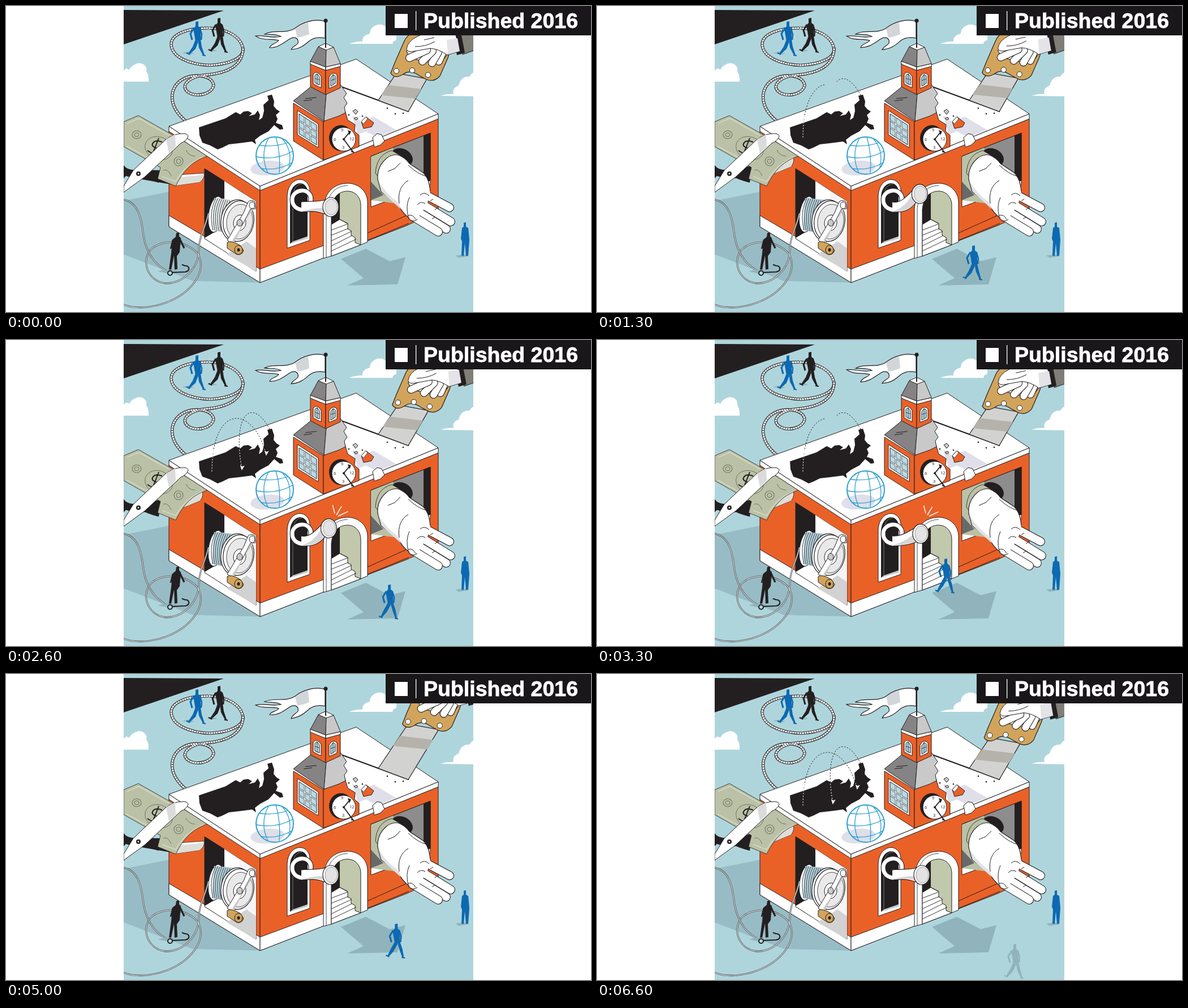
Animation of 1034 by 542 pixels, one loop 6.7 s. Source, as an HTML page with a canvas:

```html
<!DOCTYPE html>
<html lang="en">
<head>
<meta charset="utf-8">
<title>Published 2016</title>
<style>
html, body { margin: 0; width: 100%; height: 100%; overflow: hidden; background: #fff; }
canvas { display: block; }
</style>
</head>
<body>
<canvas id="stage" width="1034" height="542"></canvas>
<script>
const ctx = document.getElementById('stage').getContext('2d');
const LOOP = 6700, TAU = Math.PI * 2;
const INK = '#231f20', SKY = '#afd5dc', SHADE = '#91b4bc', ORANGE = '#ea6128',
  WHITE = '#fff', BILL = '#bbc1a6', BLUE = '#0c69b2', TAN = '#d2a45b', GREY = '#858384', PALE = '#c9c9ca';

function path(d, fill, stroke, width = 1) {
  const p = new Path2D(d);
  if (fill) { ctx.fillStyle = fill; ctx.fill(p); }
  if (stroke) { ctx.strokeStyle = stroke; ctx.lineWidth = width; ctx.stroke(p); }
}
function oval(x, y, rx, ry, fill, stroke, width = 1, turn = 0) {
  ctx.beginPath();
  ctx.ellipse(x, y, rx, ry, turn, 0, TAU);
  if (fill) { ctx.fillStyle = fill; ctx.fill(); }
  if (stroke) { ctx.strokeStyle = stroke; ctx.lineWidth = width; ctx.stroke(); }
}
function moved(x, y, turn, draw) {
  ctx.save();
  ctx.translate(x, y);
  ctx.rotate(turn);
  draw();
  ctx.restore();
}
// Linear interpolation through rows of [time, value, ...]
function keyed(rows, t) {
  if (t <= rows[0][0]) return rows[0].slice(1);
  for (let i = 1; i < rows.length; i++) {
    const a = rows[i - 1], b = rows[i];
    if (t <= b[0]) {
      const k = (t - a[0]) / (b[0] - a[0]);
      return a.slice(1).map((v, j) => v + (b[j + 1] - v) * k);
    }
  }
  return rows[rows.length - 1].slice(1);
}

// A white tube with an ink edge and round ends
function tube(d, width, cap = 'round') {
  ctx.lineCap = cap;
  path(d, null, INK, width);
  path(d, null, WHITE, width - 2.2);
  ctx.lineCap = 'butt';
}
function rope(d) {
  tube(d, 5.2, 'butt');
  ctx.setLineDash([.9, 3.4]);
  path(d, null, INK, 3);
  ctx.setLineDash([]);
}
function line(d) {
  path(d, null, '#4c4c4d', 2.8);
  path(d, null, '#dbe6e8', 1.2);
}

// A striding figure; x is its middle, y the top of its head
function walker(x, y, color, swing = 0) {
  moved(x, y, 0, () => {
    path('M-1 1L4 0L4 9L8 12L8 33L-1 36L-5 13L-1 9Z', color);
    path('M-4 12L-10 22L-7 33', null, color, 3);
    path('M7 13L10 23L9 33', null, color, 2.5);
    path(`M-1 32L${-7 + swing} 45L-14 57L-12 59L${-2 + swing} 49L4 36Z`, color);
    path(`M3 32L${6 - swing} 47L12 60L15 60L${11 - swing} 45L8 32Z`, color);
    path('M-17 56L-11 59M11 60L17 61', null, color, 2);
  });
}

function backdrop() {
  ctx.fillStyle = SKY;
  ctx.fillRect(208, 0, 618, 542);
  path('M208 7L385 8L208 68Z', INK);
  path('M208 134H252Q253 123 248 116C251 105 238 98 229 103Q221 106 218 113Q212 108 208 115Z', WHITE);
  path('M606 67Q623 62 630 63Q629 52 643 49C643 35 661 28 670 36Q680 32 690 38V60Q681 64 684 67Z', WHITE);
  path('M768 159Q780 155 791 156Q788 145 800 141Q804 124 819 125Q823 119 826 118V160Z', WHITE);
  path('M208 345L288 329V388L449 490L330 487L208 440Z', '#98bcc6');
  path('M592 448L636 430L678 452L706 445L692 493L603 495L632 482Z', SHADE);
  rope('M358 39C318 39 291 51 292 69C294 90 323 104 361 105C396 103 419 92 419 77C416 53 388 40 359 39');
  rope('M419 74C419 105 392 119 353 122C323 125 310 140 319 150C332 164 365 157 367 140C364 122 331 119 312 130C289 143 284 176 318 204');
  path('M311 83L321 81L333 84L325 86ZM355 78L363 76L374 79L363 81Z', SHADE);
  walker(336, 27, BLUE, 1);
  walker(375, 21, INK, 1);
}

function flag(t) {
  const w = 2 * Math.sin(t / LOOP * TAU * 5);
  path(`M564 27C546 22 525 28 510 40C494 50 472 41 457 ${50 + w / 2}C468 51 478 49 486 54
    C468 58 456 51 441 ${53 - w}C454 62 469 57 482 61C478 67 468 66 466 ${74 + w}
    C481 74 491 65 502 58C511 53 518 58 516 66C512 71 507 71 504 ${77 - w}
    C521 76 529 68 536 62C545 55 555 55 564 57Z`, WHITE, INK, 1.2);
  path('M511 40Q522 32 534 29L536 50Q524 55 515 56Z', '#d2d6d9');
  path('M565 26V74', null, INK, 2);
  oval(565, 26, 3.5, 3.5, INK);
}

function walls() {
  path('M288 221L449 326V490L288 391Z', ORANGE, INK);
  path('M449 326L764 200V363L708 389L449 490Z', ORANGE, INK);
  path('M288 371L449 466V490L288 391Z', WHITE, INK);
  path('M449 466L562 424V446L449 490Z', WHITE, INK);
  path('M639 402L708 371L745 355M639 415L712 385', null, INK, 1);
}

function roof() {
  path('M288 213L449 319V327L288 222Z', WHITE, INK);
  path('M449 319L764 191V200L449 327Z', WHITE, INK);
  path('M288 213L619 94L764 191L449 319Z', WHITE, INK);
  path('M612 194L628 205L650 196L690 220L655 232L636 222L622 228Z', '#dedfe8');
  path('M590 142L658 167L712 187', null, INK, 2.2);
  path('M341 215L388 199L406 188L414 192L420 187L428 186L435 190L429 195L440 192L445 185L449 193L447 202L453 198L456 186L455 175L464 167L462 159L470 157L474 169L473 177L478 183L484 187L477 193L480 200L477 207L488 211L490 218L484 219L474 211L464 222L449 230L440 237L442 245L435 240L412 243L394 245L382 251L374 254L361 247L347 242L342 229Z', INK);
}

function globe() {
  oval(462, 287, 30, 13, '#dedfe9', null, 1, -.1);
  const c = '#2e9fd0';
  oval(475, 265, 33, 33, null, c, 2);
  path('M448 247Q476 250 498 242M442 267Q478 274 507 257M452 288Q483 292 506 277', null, c, 1.3);
  path('M464 234Q448 264 463 296M477 232Q486 263 483 297M488 235Q507 255 500 285', null, c, 1.3);
}

function arcs(t) {
  const grown = Math.min(1, t % 1000 / 600);
  if (!grown) return;
  const curves = [
    [364, 233, 364, 113, 436, 113, 460, 203],
    [466, 158, 435, 100, 399, 130, 417, 229]
  ];
  for (const c of curves) {
    const at = (u, i) => c[i] * (1 - u) ** 3 + 3 * c[i + 2] * u * (1 - u) ** 2 + 3 * c[i + 4] * u * u * (1 - u) + c[i + 6] * u ** 3;
    const trace = color => {
      ctx.beginPath();
      for (let u = 0; u <= grown + .001; u += .02) ctx.lineTo(at(u, 0), at(u, 1));
      ctx.strokeStyle = color;
      ctx.lineWidth = 1;
      ctx.stroke();
    };
    ctx.setLineDash([2.5, 2.5]);
    trace(INK);
    // The part of a line that lies on the dark map shows light
    ctx.save();
    ctx.beginPath();
    ctx.rect(345, 193, 128, 45);
    ctx.clip();
    trace(WHITE);
    ctx.restore();
    ctx.setLineDash([]);
    if (grown === 1) moved(c[6], c[7], .1, () => path('M0 2L-4 -7L0 -5L4 -7Z', WHITE));
  }
}

function tower() {
  path('M508 172L561 205V273L508 239Z', ORANGE, INK);
  path('M561 205L599 185L604 202L617 210L616 222L624 229V249L561 273Z', ORANGE, INK);
  path('M515 185L552 209V251L515 228Z', WHITE, INK);
  path('M518 191L549 211V246L518 226Z', '#b8dbe5', INK);
  const bars = 'M528 198V232M538 204V239M518 203L549 223M518 215L549 235';
  path(bars, null, INK, 2.6);
  path(bars, null, WHITE, 1.4);
  path('M508 168L540 142L566 156L562 204Z', GREY, INK);
  path('M566 156L591 139L602 155L597 162L603 172L598 179L600 189L588 195L562 204Z', PALE, INK);
  path('M529 164L549 162M526 168L541 166', null, INK);
  path('M538 102L565 114V157L538 143Z', ORANGE, INK);
  path('M565 114L591 106V145L565 157Z', ORANGE, INK);
  path('M538 97L565 108V114L538 103ZM565 108L591 102V107L565 114Z', WHITE, INK);
  path('M552 72L566 77L565 108L538 98Z', GREY, INK);
  path('M566 77L579 73L591 102L565 108Z', PALE, INK);
  path('M552 72L565 66L579 73L566 78Z', WHITE, INK);
  path('M543 138V121Q549 112 557 125V145ZM571 146V126Q577 114 585 122V140Z', WHITE, INK);
  path('M546 136V123Q550 117 554 126V140ZM574 142V127Q578 119 582 124V137Z', '#b8dbe5', INK);
  path('M550 119V139M546 128L554 131M578 120V139M574 132L582 129', null, INK, .8);
  oval(592, 234, 21, 23, INK);
  oval(597, 236, 21, 21, WHITE, INK);
  path('M613 258L597 236L606 225', null, INK, 1.8);
  path('M604 220L610 222L607 229ZM611 255L617 260L610 259Z', INK);
  oval(597, 236, 2, 2, INK);
  ctx.fillStyle = INK;
  ctx.font = '7.5px "Open Sans", sans-serif';
  ctx.fillText('12', 607, 238);
  ctx.fillText('9', 592, 222);
  ctx.fillText('6', 579, 239);
  ctx.fillText('3', 594, 253);
}

function rubble() {
  path('M628 205L636 196L650 207L646 214L632 217Z', ORANGE, INK);
  path('M628 205L636 196L639 200L632 209Z', WHITE, INK, .7);
  path('M648 233L656 226L664 228L669 239L662 246L651 250Z', WHITE, INK);
  path('M613 186L618 183L622 187L618 192ZM615 199L620 197L622 200L618 202Z', PALE, INK);
  for (const [x, y] of [[606, 193], [688, 191], [702, 190], [674, 181], [630, 195]]) oval(x, y, 1.3, 1.3, INK);
}

function windowLeft(t) {
  path('M351 288L442 346V470L351 412Z', '#e8e8e8', INK);
  path('M351 288L386 310V390L351 411Z', INK);
  path('M386 310L412 327V392L386 407Z', WHITE);
  path('M412 327L442 346V450L412 430Z', '#f5f5f5');
  path('M351 411L385 391L442 430V470Z', WHITE);
  path('M390 440L425 417L442 429V470Z', '#d2d2d2');
  reel(t);
}

// The spool turns once in four steps, showing its blue side for two of them
function reel(t) {
  const step = t / 100 % 4;
  const blue = step === 1 || step === 2;
  oval(371, 369, 13, 32, WHITE, INK, 1.2, .15);
  path('M368 340L404 343V404L364 397Z', blue ? '#b5d3de' : '#e9eced');
  for (let i = 0; i < 11; i++) {
    const x = 366 + i * 3.6;
    path(`M${x + 5} ${340 + i * .6}Q${x - 8} ${366 + i} ${x} ${397 + i * .7}`, null, '#4f5558', 1.1);
  }
  oval(407, 380, 27, 37, WHITE, INK, 1.2, .15);
  oval(411, 381, 27, 36, WHITE, INK, 1.2, .15);
  oval(413, 382, 23, 31, '#e9e9e9', INK, .8, .15);
  oval(413, 384, 11, 14, WHITE, INK, 1, .15);
  path('M428 347Q433 342 440 347L441 359L432 360L401 421L391 415L420 366Z', WHITE, INK);
  path('M438 358L432 361L403 419L400 415Z', PALE);
  oval(413, 384, 5, 6, PALE, INK);
  oval(435, 353, 5, 6, WHITE, INK);
  path('M391 419Q397 414 414 424L420 433Q417 442 408 440L391 429Z', TAN, INK);
  oval(411, 432, 7, 8, TAN, INK);
  oval(411, 432, 2.5, 3, INK);
}

function bill() {
  path('M208 205L234 194L322 244L356 266C332 273 314 290 300 319L268 306L273 286L208 249Z', BILL, INK, .8);
  path('M214 208L235 199L288 229M213 248L268 278M349 267Q317 280 300 311L276 302', null, '#dfe3d0', 1.2);
  const print = '#6d7560';
  oval(231, 228, 8, 7, null, print, 1.1);
  oval(231, 228, 4, 3.5, null, print);
  oval(305, 275, 8, 8, null, print, 1.1);
  oval(305, 275, 4, 4, null, print);
  oval(270, 252, 25, 20, null, print, 1, .4);
  path('M276 241Q263 236 259 244C255 252 276 251 271 259Q264 266 250 256M270 234L257 267', null, INK, 2);
  path('M278 291Q286 287 292 301M318 255Q322 265 334 266', null, print, 1);
}

function scissorsLow(t) {
  const [open] = keyed([[0, 1], [200, .1], [300, 0], [800, 0], [900, .5], [1000, 1]], t % 1000);
  path('M208 282Q215 292 232 290L273 291L270 313Q247 307 239 301Q225 306 212 301L208 305Z', INK);
  moved(234, 297, (open - 1) * .25, () => {
    path('M0 -6L62 -3L58 19L6 10Z', INK);
    path('M56 3L116 -1Q118 7 109 15L66 21L52 16Z', WHITE, INK, .8);
    path('M57 8L116 2L109 15L66 21Z', '#deded8');
  });
}
function scissorsTop() {
  path('M208 319L225 291L282 237Q297 225 315 226Q322 227 322 231Q319 239 309 243L245 303L208 330Z', WHITE, INK);
  path('M283 236L299 227L300 249L288 261Z', '#dbdbdb');
  oval(234, 297, 4, 4, INK);
  oval(234, 297, 1.4, 1.4, WHITE);
}

function archWindow() {
  path('M497 429V337C498 302 533 298 537 325V415Z', WHITE, INK);
  path('M502 421V338C503 311 529 306 533 327V410Z', INK);
  path('M502 421L507 417L533 408V412Z', PALE);
  path('M507 417V338Q508 316 523 315', null, '#777', 1);
}

function door() {
  path('M561 447V360C563 327 582 314 605 314C625 315 638 329 639 346V418L627 423L575 443Z', WHITE, INK);
  path('M575 443V361C577 336 591 327 606 328C619 329 627 341 627 352V423Z', '#c2c8ac', INK);
  path('M575 443V361C577 343 582 336 590 331V380L575 388Z', INK);
  path('M575 387L590 378L604 385V395L610 398V406L617 410V419L627 423L575 443Z', WHITE, INK);
  path('M575 397L604 386M575 406L605 394M575 416L611 399M575 425L611 407M575 434L619 413M590 378L603 385', null, INK, .9);
  path('M566 446V360C568 333 583 318 604 318', null, INK, .8);
}

function knocker(t) {
  const [up] = keyed([[0, 0], [1000, 0], [1300, .72], [1600, 1], [1900, 1], [3300, .4], [4300, 0]], t);
  const x = 574 - 5 * up, y = 356 - 32 * up;
  tube('M538 348C542 334 532 326 522 327C512 328 506 335 506 343C506 354 514 361 526 361', 9);
  const top = `M522 347C${532 + 4 * up} ${345 + 8 * up} 548 ${348 - 14 * up} ${x - 7} ${y - 13}`;
  const bottom = `L${x - 6} ${y + 14}C${550 + 5 * up} ${363 - 2 * up} 544 ${363 + 4 * up} 522 365`;
  path(`${top}${bottom}Z`, WHITE);
  path(top, null, INK, 1.1);
  path(bottom.replace('L', 'M'), null, INK, 1.1);
  path(`M${x - 14} ${y + 2}L${x - 6} ${y + 13}C555 ${361 - 2 * up} 544 ${362 + 3 * up} 522 364Q544 ${357 + up} ${x - 14} ${y + 2}Z`, '#d6d6d8');
  oval(x, y, 14, 17, WHITE, INK, 1.2);
  oval(x + 1, y, 11, 14, '#e3e3e3', '#777', .7);
  if (t >= 1500 && t <= 4400) {
    const [k] = keyed([[1500, .5], [1900, 1], [3300, .85], [4300, .6]], t);
    for (const [sx, sy, dx, dy] of [[581, 307, -4, -16], [584, 310, 10, -17], [587, 312, 19, -9]]) {
      path(`M${sx} ${sy}L${sx + dx * k} ${sy + dy * k}`, null, WHITE, 1.5);
    }
  }
}

function windowRight() {
  path('M645 266L750 225V317L645 356Z', WHITE, INK);
  path('M645 266L750 225V309L645 344Z', '#8d8d8d', INK);
  path('M738 230L750 225V309L738 315Z', INK);
  path('M645 267L684 251L692 350L645 344Z', BILL);
  path('M645 311L667 335L645 344Z', '#696969');
  oval(700, 268, 20, 15, INK, null, 1, .5);
  path('M653 296Q655 263 682 256L699 266Q670 276 666 314Z', BILL, INK, .8);
  for (const d of ['M735 331L784 357', 'M734 350L786 382', 'M728 364L778 395', 'M718 372L764 400']) tube(d, 16);
  path('M657 307C655 282 675 260 694 264Q706 269 713 279L737 295Q748 305 750 329L744 352L724 381Q716 381 710 374Q699 364 693 351L663 329Z', WHITE);
  path('M713 376Q699 365 693 351L663 329L657 307C655 282 675 260 694 264Q706 269 713 279L737 295Q748 305 750 329', null, INK, 1.2);
  path('M713 339Q706 354 711 374M695 350Q691 321 711 309M711 282Q728 298 744 302M675 293L687 288L697 278M711 371Q719 368 724 378M712 377Q719 384 727 378M732 335Q739 328 748 336M727 352Q733 345 741 350M750 345L755 342M758 361L763 357M753 377L758 374', null, INK, 1);
  path('M658 309Q670 331 692 347L698 360L664 329Z', '#e2e2e6');
}

function saw(t) {
  const pull = Math.sin(Math.PI * t / 670) ** 2;
  const dx = 21 * pull, dy = -31 * pull;
  path(`M658 167L${690 + dx} ${119 + dy}L${744 + dx} ${129 + dy}L711 187Z`, '#d2d3d1', INK, 1.2);
  path(`M${676 + dx} ${140 + dy}L${734 + dx} ${147 + dy}L${724 + dx} ${164 + dy}L${663 + dx} ${158 + dy}Z`, '#b5b2ab');
  moved(dx, dy, 0, () => {
    path('M680 119L687 101L704 62Q711 47 733 43L791 58L781 92L767 124Q756 136 743 130Q733 125 723 119Q711 114 702 121Q687 130 680 119Z', TAN, INK, 1.2);
    for (const [x, y] of [[690, 115], [718, 114], [746, 122]]) oval(x, y, 4.6, 4.6, WHITE, INK);
    path('M799 40L850 20L880 60L807 86Z', '#807f77', INK);
    path('M790 49L804 46L811 83L797 87Z', INK);
    path('M722 58L748 45L794 47L802 80L779 87L766 104L714 92L708 80Z', WHITE, INK, 1.1);
    for (const d of ['M772 82L765 98', 'M764 82L753 101', 'M754 80L736 98', 'M744 78L713 92']) tube(d, 14);
    path('M708 76Q710 62 727 54L750 44L792 46L800 80L779 86Q764 76 750 75L722 80Q709 83 708 76Z', WHITE);
    path('M779 86Q764 76 750 75L722 80Q709 83 708 76Q710 62 727 54L750 44M723 72Q742 72 758 63M739 60L757 56', null, INK, 1);
    path('M779 60L798 57L802 80L781 86Z', '#e3e3e8');
  });
}

function lines() {
  line('M358 367C352 394 344 401 341 426C343 467 309 494 280 491C250 485 239 454 255 432C278 409 325 417 341 442C356 478 318 516 272 529C246 536 224 535 208 529');
  line('M208 343C235 348 240 380 243 407C249 444 270 464 290 472');
}

function bystanders() {
  path('M268 470L280 467L304 470L291 475Z', SHADE);
  path('M301 402L306 401L306 408L309 411L307 436L302 443L303 466L298 467L297 442L292 467L288 467L292 438L294 414L300 409Z', INK);
  path('M307 412L315 429', null, INK, 3);
  path('M295 414L291 430', null, INK, 2.5);
  oval(290, 473, 4, 4, SKY, INK, 2);
  path('M294 472L317 471C326 469 325 460 316 460L311 458', null, INK, 2.2);
  path('M794 442L810 440L819 443L800 446Z', SHADE);
  path('M809 384L813 383V391L817 393L819 414L817 442L813 443L811 420L809 443L805 442L806 417L804 412L806 393L809 391Z', BLUE);
}

function crowd(t) {
  // Each walker is placed by the time left until it leaves the panel
  const track = [[0, 737, 478], [600, 664, 424], [900, 627, 397], [1000, 615, 387], [1100, 612, 385], [1200, 606, 374], [1300, 601, 368]];
  for (const end of [1900, 3100, 4300, 5400, 6600]) {
    const left = end - t;
    if (left < 0 || left > 1300) continue;
    const [x, y] = keyed(track, left);
    walker(x, y, left ? BLUE : SHADE, 1.5 * Math.sin(left / 600 * TAU));
  }
}

function header() {
  ctx.fillStyle = '#19171a';
  ctx.fillRect(671, 0, 363, 52);
  ctx.fillStyle = ctx.strokeStyle = WHITE;
  ctx.fillRect(687, 14, 23, 25);
  ctx.fillRect(724, 9, 1.3, 34);
  ctx.font = 'bold 37.5px "Liberation Sans", Arial, sans-serif';
  ctx.lineWidth = .8;
  ctx.fillText('Published 2016', 738, 38.5);
  ctx.strokeText('Published 2016', 738, 38.5);
}

function draw(now) {
  const t = Math.floor(now % LOOP / 100) * 100;
  ctx.fillStyle = WHITE;
  ctx.fillRect(0, 0, 1034, 542);
  ctx.save();
  ctx.beginPath();
  ctx.rect(208, 0, 618, 542);
  ctx.clip();
  backdrop();
  walls();
  windowLeft(t);
  scissorsLow(t);
  bill();
  roof();
  scissorsTop();
  arcs(t);
  globe();
  tower();
  flag(t);
  saw(t);
  archWindow();
  door();
  knocker(t);
  windowRight();
  rubble();
  lines();
  bystanders();
  crowd(t);
  ctx.restore();
  header();
}

const start = performance.now();
function tick() {
  draw(performance.now() - start);
  requestAnimationFrame(tick);
}
tick();
</script>
</body>
</html>
```
